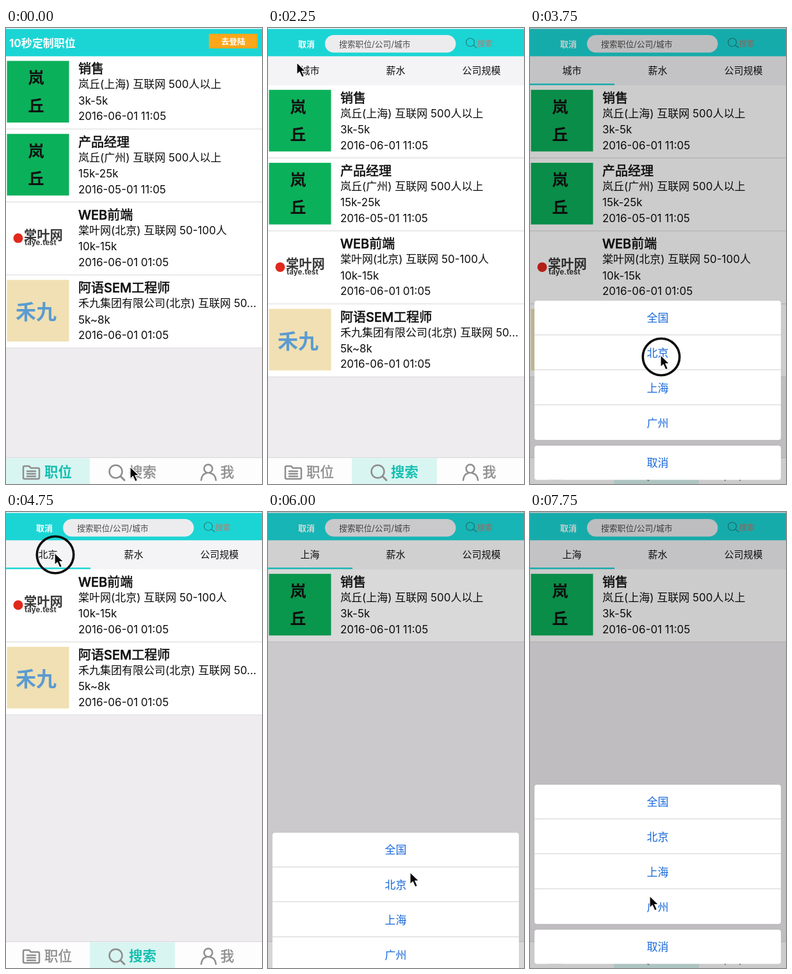
These frames come from a looping animation (400 by 714 pixels, 8 s). An HTML page:

```html
<!DOCTYPE html>
<html lang="zh-CN">
<head>
<meta charset="utf-8">
<style>
html, body { margin: 0; width: 100%; height: 100%; overflow: hidden; }
svg { display: block; width: 400px; height: 714px; }
text { font-family: Inter, "Noto Sans CJK SC", "Noto Sans CJK", sans-serif; white-space: pre; }
</style>
</head>
<body>
<svg id="stage" viewBox="0 0 400 714"></svg>
<script>
const LOOP = 8000, STEP = 250;
const TEAL = '#1bd5d5', GRAY = '#8e8e8e';
const JOBS = [
  { tile: 'green', city: '上海', lines: ['销售', '岚丘(上海) 互联网 500人以上', '3k-5k', '2016-06-01 11:05'] },
  { tile: 'green', city: '广州', lines: ['产品经理', '岚丘(广州) 互联网 500人以上', '15k-25k', '2016-05-01 11:05'] },
  { tile: 'word', city: '北京', lines: ['WEB前端', '棠叶网(北京) 互联网 50-100人', '10k-15k', '2016-06-01 01:05'] },
  { tile: 'tan', city: '北京', lines: ['阿语SEM工程师', '禾九集团有限公司(北京) 互联网 50...', '5k~8k', '2016-06-01 01:05'] }
];
// time, x, y of the pointer tip
const POINTER = [
  [0, 194, 687], [1000, 194, 687], [2250, 45, 54], [2500, 52, 62], [2750, 60, 70],
  [3500, 204, 517], [3750, 204, 512], [4000, 202, 505], [4500, 76, 64], [5000, 76, 64],
  [5500, 222, 564], [6000, 222, 564], [6750, 78, 63], [7000, 78, 63], [7250, 86, 63],
  [7500, 86, 63], [7750, 187, 601], [8000, 187, 601]
];
const PRESSES = [250, 2500, 3750, 4750, 5750, 7500];
const SHEETS = [[2400, 3850], [4900, 5900], [7200, 9000]];

const clamp = v => Math.min(1, Math.max(0, v));
const smooth = v => v * v * (3 - 2 * v);

const rect = (x, y, w, h, fill, r = 0) =>
  `<rect x="${x}" y="${y}" width="${w}" height="${h}" rx="${r}" fill="${fill}"/>`;
const path = (d, color, width) =>
  `<path d="${d}" fill="none" stroke="${color}" stroke-width="${width}" stroke-linecap="round"/>`;
const circle = (x, y, r, attrs) => `<circle cx="${x}" cy="${y}" r="${r}" ${attrs}/>`;
// y is the vertical middle of the text; a thin stroke stands in for the medium CJK weight
const text = (s, x, y, size, fill, weight = 400, anchor = 'start') =>
  `<text x="${x}" y="${y + size * 0.37}" font-size="${size}" fill="${fill}" font-weight="${weight}" text-anchor="${anchor}"` +
  `${weight === 500 ? ` stroke="${fill}" stroke-width="0.5"` : ''}>${s}</text>`;
const label = (s, x, y, size, fill, weight) => text(s, x, y, size, fill, weight, 'middle');

const TILES = {
  green: y => rect(1.5, y + 7, 97, 96.5, '#0bb05a') +
    label('岚', 47, y + 33.5, 25, '#111', 700) + label('丘', 47, y + 77, 25, '#111', 700),
  word: y => circle(19, y + 56, 7.5, 'fill="#e0281c"') +
    text('棠叶网', 28, y + 51, 20.3, '#3a3a3a', 700) + text('taye.test', 29, y + 63, 11.5, '#3a3a3a', 700),
  tan: y => rect(1.5, y + 7, 97, 96.5, '#f0e0b3') + label('禾九', 47, y + 57, 32, '#5b9bd0', 700)
};

const jobRow = (job, y) => rect(0, y, 400, 114.3, '#fff') + rect(0, y + 113, 400, 1.3, '#dddddf') +
  TILES[job.tile](y) +
  job.lines.map((s, i) => text(s, 113, y + [19.5, 43.7, 69, 93.5][i], i ? 17 : 20, '#0c0c0c', i ? 400 : 500)).join('');

function homeHeader() {
  return text('10秒定制职位', 5, 24, 17, '#fff', 700) +
    rect(317, 9, 76, 23, '#fba71b', 1) + label('去登陆', 355, 21, 12.5, '#fff', 700);
}

function searchHeader(city, underlined) {
  return label('取消', 60, 25.5, 13, '#fff', 700) + rect(89, 11, 204.5, 27.5, '#ececee', 14) +
    text('搜索职位/公司/城市', 111, 25, 12.8, '#4a4a4a') +
    circle(316, 22.5, 6.5, 'fill="none" stroke="#25807f" stroke-width="1.2"') +
    path('M321 27l5 4', '#25807f', 1.2) + text('搜索', 327, 25, 12, '#c4756b') +
    rect(0, 44.5, 400, 45.5, '#f4f4f6') +
    [city, '薪水', '公司规模'].map((s, i) => label(s, 65.5 + i * 134, 66, 15, '#111')).join('') +
    (underlined ? rect(0, 87, 132, 2.5, TEAL) : '');
}

function tabBar(active) {
  const edges = [0, 131, 264, 400];
  return rect(0, 672, 400, 42, '#fdfdfd') + rect(0, 672, 400, 1.2, '#d8d8da') +
    rect(edges[active], 673.5, edges[active + 1] - edges[active], 41, '#d9f5f1') +
    path('M27 705V688q0-2 2-2h7l3 3h11q2 0 2 2v13q0 2-2 2H29q-2 0-2-2M33 694h13M33 698h13M33 702h13', GRAY, 2.5) +
    circle(171.5, 694.5, 10, `fill="none" stroke="${GRAY}" stroke-width="2.5"`) + path('M179 702l6 6', GRAY, 3) +
    circle(316, 690, 6.5, `fill="none" stroke="${GRAY}" stroke-width="2.5"`) +
    path('M305 708q1-10 8-11M319 697q8 1 9 11', GRAY, 2.5) +
    ['职位', '搜索', '我'].map((s, i) =>
      text(s, [60, 192, 335][i], 695, 21.4, i === active ? '#14bfb0' : GRAY, i === active ? 700 : 500)).join('');
}

function actionSheet(open) {
  const blue = '#1767d8';
  return rect(0, 0, 400, 714, `rgba(0,0,0,${0.2 * open})`) +
    `<g transform="translate(0 ${290 * (1 - open)})">` +
    rect(7, 427, 385, 218, '#fff', 4) + rect(7, 654, 385, 53.5, '#fff', 4) +
    [480.5, 535, 590].map(y => rect(7, y - 0.7, 385, 1.4, '#dcdcde')).join('') +
    ['全国', '北京', '上海', '广州'].map((s, i) => label(s, 199.5, 453.5 + i * 55, 17, blue)).join('') +
    label('取消', 199.5, 681, 17, blue) + '</g>';
}

function pointer(t) {
  const i = POINTER.findIndex(p => p[0] > t);
  const [a, b] = [POINTER[i - 1], POINTER[i]];
  const k = smooth((t - a[0]) / (b[0] - a[0]));
  const x = a[1] + (b[1] - a[1]) * k, y = a[2] + (b[2] - a[2]) * k;
  const ring = PRESSES.includes(t)
    ? circle(x + 1, y + 3, 28.7, 'fill="none" stroke="#0a0a0a" stroke-width="3.6"') : '';
  return ring + `<path transform="translate(${x} ${y})" d="M0 0V19l4.3-4 3.6 8 3.6-1.6-3.5-7.7h6z" fill="#080808" stroke="#fff" stroke-width="1.2"/>`;
}

function scene(t) {
  const searching = t >= 500;
  const city = t < 4000 ? '城市' : t < 6000 ? '北京' : '上海';
  const jobs = JOBS.filter(job => city === '城市' || job.city === city);
  const open = Math.max(...SHEETS.map(([up, down]) =>
    smooth(clamp((t - up) / 300)) * (1 - smooth(clamp((t - down) / 300)))));
  return rect(0, 0, 400, 714, '#eeecee') + rect(0, 0, 400, 1.5, '#f2f6f6') + rect(0, 1.5, 400, 43, TEAL) +
    (searching ? searchHeader(city, t >= 2500) : homeHeader()) +
    jobs.map((job, i) => jobRow(job, (searching ? 89.8 : 44.5) + i * 114.3)).join('') +
    tabBar(searching ? 1 : 0) + (open ? actionSheet(open) : '') + pointer(t);
}

const stage = document.getElementById('stage');
let shown = -1;
function draw() {
  const t = Math.floor(performance.now() % LOOP / STEP) * STEP;
  if (t !== shown) stage.innerHTML = scene(shown = t);
  requestAnimationFrame(draw);
}
draw();
</script>
</body>
</html>
```
